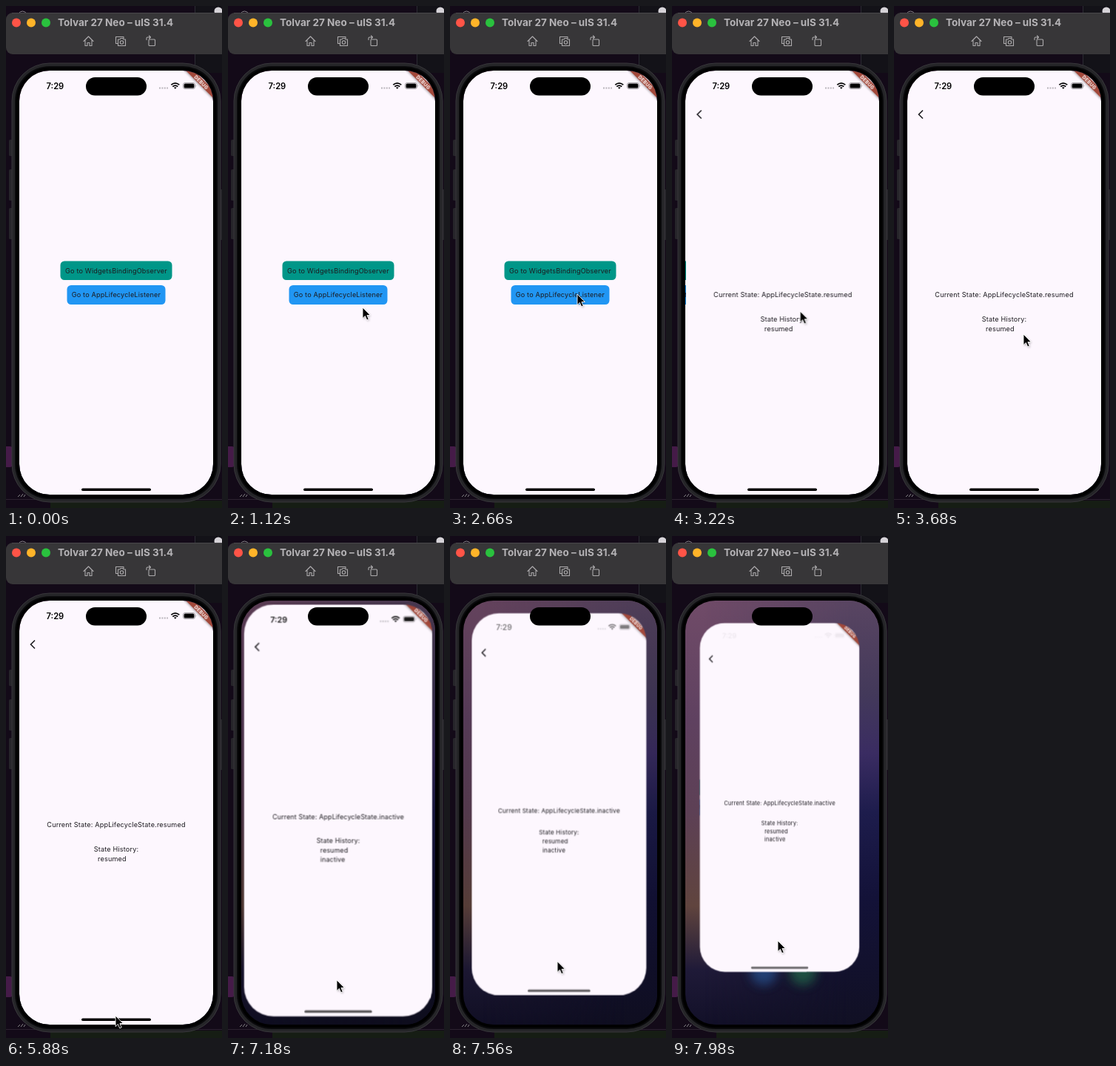
Animation, 292 px wide and 676 px high, one loop 8000 ms. Source, as an HTML page:

```html
<!DOCTYPE html>
<html lang="en">
<head>
<meta charset="utf-8">
<title>Lifecycle demo</title>
<style>
html, body { margin: 0; width: 100%; height: 100%; overflow: hidden; background: #130a18; }
svg { display: block; width: 292px; height: 676px; }
text { font-family: Inter, Roboto, sans-serif; }
.body { font-size: 9.1px; letter-spacing: .17px; fill: #1d1b20; }
.mid { text-anchor: middle; }
.icon { fill: none; stroke: #acaaac; stroke-width: 1.1; stroke-linejoin: round; stroke-linecap: round; }
</style>
</head>
<body>
<svg viewBox="0 0 292 676">
  <defs>
    <clipPath id="glass"><rect x="18" y="87" width="262" height="571" rx="41"/></clipPath>
    <linearGradient id="left" x1="0" y1="0" x2="0" y2="1">
      <stop offset="0" stop-color="#704b68"/>
      <stop offset=".28" stop-color="#5f4160"/>
      <stop offset=".5" stop-color="#5d4055"/>
      <stop offset=".72" stop-color="#60443e"/>
      <stop offset=".87" stop-color="#1f1a38"/>
      <stop offset="1" stop-color="#121028"/>
    </linearGradient>
    <linearGradient id="right" x1="0" y1="0" x2="0" y2="1">
      <stop offset="0" stop-color="#594562"/>
      <stop offset=".22" stop-color="#43395a"/>
      <stop offset=".36" stop-color="#3a2c62"/>
      <stop offset=".5" stop-color="#1d1c4c"/>
      <stop offset=".7" stop-color="#131238"/>
      <stop offset="1" stop-color="#111024"/>
    </linearGradient>
    <linearGradient id="fade">
      <stop offset=".1" stop-color="#000"/>
      <stop offset=".85" stop-color="#fff"/>
    </linearGradient>
    <mask id="side"><rect x="18" y="87" width="262" height="571" fill="url(#fade)"/></mask>
    <filter id="blur" x="-80%" y="-80%" width="260%" height="260%"><feGaussianBlur stdDeviation="7"/></filter>
    <filter id="soft" x="-50%" y="-50%" width="200%" height="200%"><feGaussianBlur stdDeviation="1.5"/></filter>
  </defs>

  <!-- desktop -->
  <rect width="292" height="676" fill="#130a18"/>
  <rect x="255" width="37" height="90" fill="#131218"/>
  <path d="M255.500 0V90" stroke="#2c2a32"/>
  <circle cx="287" cy="7" r="5.500" fill="#d6d3d8"/>
  <path d="M17 10q5-6 11 0" fill="none" stroke="#858288"/>
  <rect x="-4" y="593" width="13" height="28" rx="4" fill="#451b48"/>
  <rect x="60" y="666" width="232" height="10" fill="#161d14"/>
  <path d="M0 664.500H292" stroke="#2c2230"/>
  <path d="M16 661l3-3M20 661l3-4M24 661l2-3" stroke="#88858a"/>

  <!-- window bar -->
  <rect x="0" y="9" width="304" height="56" rx="9" fill="#373638"/>
  <path d="M8 9.500H292" stroke="#48474a"/>
  <circle cx="14" cy="22.500" r="6" fill="#ff5447"/>
  <circle cx="34" cy="22.500" r="6" fill="#ffb429"/>
  <circle cx="54" cy="22.500" r="6" fill="#2ac13e"/>
  <text x="70" y="27" font-size="13.500" font-weight="700" fill="#b5b3b6">Tolvar 27 Neo – ulS 31.4</text>
  <g class="icon">
    <path d="M105 47.500l6.500-6.500 6.500 6.500M107 46.500v7h3v-4h3v4h3v-7"/>
    <path d="M151 50.500h-2.500v-9h10.500v2"/>
    <path d="M151.500 45h2.500l1-1.500h3l1 1.500h2.500v8.500h-10z"/>
    <circle cx="156.500" cy="49" r="2.200"/>
    <rect x="193" y="45" width="8.500" height="8.500" rx="1"/>
    <path d="M190 45.500v-2q0-1.500 1.500-1.500h3.500M193.500 40l2 2-2 2"/>
  </g>

  <!-- phone body -->
  <g fill="#26252a">
    <rect x="4" y="180" width="6" height="22" rx="1.500"/>
    <rect x="4" y="220" width="6" height="42" rx="1.500"/>
    <rect x="4" y="272" width="6" height="42" rx="1.500"/>
    <rect x="288" y="247" width="5" height="68" rx="1.500"/>
  </g>
  <rect x="8" y="77" width="282" height="591" rx="51" fill="#252528" stroke="#38373b"/>
  <rect x="12" y="81" width="274" height="583" rx="47" fill="#09090b"/>
  <rect x="14" y="83" width="270" height="579" rx="45" fill="#000"/>

  <g clip-path="url(#glass)">
    <!-- wallpaper -->
    <rect x="18" y="87" width="262" height="571" fill="url(#left)"/>
    <rect x="18" y="87" width="262" height="571" fill="url(#right)" mask="url(#side)"/>
    <g filter="url(#blur)" opacity=".75">
      <circle cx="124" cy="587" r="18" fill="#25508a"/>
      <circle cx="177" cy="587" r="18" fill="#24664a"/>
    </g>
    <rect id="dim" x="18" y="87" width="262" height="571" fill="#000"/>

    <g id="app">
      <g clip-path="url(#glass)">
        <g id="home">
          <rect x="18" y="87" width="262" height="571" fill="#fdf7fe"/>
          <rect x="73.500" y="343.500" width="151" height="25.500" rx="5.500" fill="#009688"/>
          <rect x="82.500" y="376" width="133" height="26" rx="5.500" fill="#2196f3"/>
          <g class="body mid">
            <text x="149" y="359.500">Go to WidgetsBindingObserver</text>
            <text x="149" y="392">Go to AppLifecycleListener</text>
          </g>
        </g>
        <g id="detail">
          <rect x="18" y="87" width="262" height="571" fill="#fdf7fe"/>
          <path d="M39 140.500l-5.500 5.500 5.500 5.500" fill="none" stroke="#1d1b20" stroke-width="1.600"/>
          <g id="copy" class="body">
            <text id="resumed" class="mid" x="149" y="391.500">Current State: AppLifecycleState.resumed</text>
            <text id="inactive" class="mid" x="149" y="391.500">Current State: AppLifecycleState.inactive</text>
            <text class="mid" x="149" y="424.500">State History:</text>
            <text x="124" y="437.500">resumed</text>
            <text id="entry" x="124" y="450.500">inactive</text>
          </g>
        </g>
        <g id="status">
          <text x="54.500" y="112" font-size="11.200" font-weight="600">7:29</text>
          <path d="M207 110.500h12" stroke="#b9b5bb" stroke-width="2" stroke-dasharray="2 1.400"/>
          <g fill="none" stroke="#000" stroke-width="1.700">
            <path d="M223.300 106.200q5.500-4.600 11 0M225.300 108.500q3.500-2.800 7 0"/>
          </g>
          <path d="M226.900 109.800q1.900-1.300 3.800 0l-1.900 2z"/>
          <rect x="239.500" y="103.500" width="16" height="8" rx="2.500" fill="none" stroke="#8b888d" stroke-width=".8"/>
          <rect x="240.600" y="104.600" width="13.800" height="5.800" rx="1.500"/>
          <path d="M256.700 106q1.400 1.500 0 3z" fill="#8b888d"/>
        </g>
        <g transform="translate(280 87) rotate(45)">
          <rect x="-40" y="18.200" width="80" height="9" fill="#000" opacity=".35" filter="url(#soft)"/>
          <rect x="-40" y="18.200" width="80" height="7.900" fill="#a2483a"/>
          <text class="mid" x="0" y="24.500" font-size="6.400" font-weight="800" letter-spacing=".35" fill="#f8eeee">DEBUG</text>
        </g>
        <rect id="bar" x="102" y="649.500" width="94" height="3.400" rx="1.700"/>
      </g>
    </g>
  </g>
  <rect x="108" y="96" width="82" height="24.500" rx="12.250" fill="#000"/>

  <g id="cursor">
    <path d="M0 0V14.500L3.400 11.400 5.700 16.800 8.200 15.700 5.900 10.500H10.400Z" transform="translate(1 1.500)" fill="#000" opacity=".3" filter="url(#soft)"/>
    <path d="M0 0V14.500L3.400 11.400 5.700 16.800 8.200 15.700 5.900 10.500H10.400Z" fill="#000" stroke="#fff" stroke-width=".9"/>
  </g>
</svg>
<script>
const LOOP = 8000;
const OPEN = 2780, OPENED = 3280, DRAG = 6860;

// steps: [ms, value, easing towards the next step]
function play(id, prop, steps) {
  const all = [[0, steps[0][1]], ...steps, [LOOP, steps[steps.length - 1][1]]];
  const frames = all.map(([ms, value, easing = 'linear']) =>
    ({ offset: ms / LOOP, [prop]: value, easing }));
  document.getElementById(id).animate(frames, { duration: LOOP, iterations: Infinity });
}

const move = (x, y) => `translate(${x}px, ${y}px)`;
const flip = (id, ms, prop, from, to) => play(id, prop, [[ms, from], [ms, to]]);

// place the app card by its centre, top edge and scale
const card = (cx, top, s) => `${move(cx - 149 * s, top - 87 * s)} scale(${s})`;

const SLIDE = 'cubic-bezier(.2, .75, .3, 1)';
const SMOOTH = 'ease-in-out';

play('home', 'transform', [[OPEN, move(0, 0), SLIDE], [OPENED, move(-87, 0)]]);
play('detail', 'transform', [[OPEN, move(264, 0), SLIDE], [OPENED, move(0, 0)]]);

flip('resumed', DRAG, 'opacity', 1, 0);
flip('inactive', DRAG, 'opacity', 0, 1);
flip('entry', DRAG, 'opacity', 0, 1);
flip('copy', DRAG, 'transform', move(0, 0), move(0, -6.5));

play('app', 'transform', [
  [DRAG, card(149, 87, 1), 'ease-in'],
  [7180, card(149, 92, .972)],
  [7980, card(145.5, 117, .823)]
]);
play('status', 'opacity', [[DRAG, 1], [7180, .9], [7980, .06]]);
play('bar', 'opacity', [[DRAG, 1], [7180, .68], [7980, .62]]);
play('dim', 'opacity', [[DRAG, .5], [7180, .2], [7980, 0]]);

flip('cursor', 340, 'opacity', 0, 1);
play('cursor', 'transform', [
  [340, move(294, 500), 'ease-out'],
  [1100, move(182, 406)],
  [1300, move(182, 406), SMOOTH],
  [2200, move(172, 388)],
  [2900, move(172, 388), SMOOTH],
  [3600, move(175, 442)],
  [4300, move(175, 442), SMOOTH],
  [5600, move(148, 646)],
  [6700, move(148, 646), 'ease-in'],
  [7180, move(147, 598)],
  [7980, move(143, 545)]
]);
</script>
</body>
</html>
```
